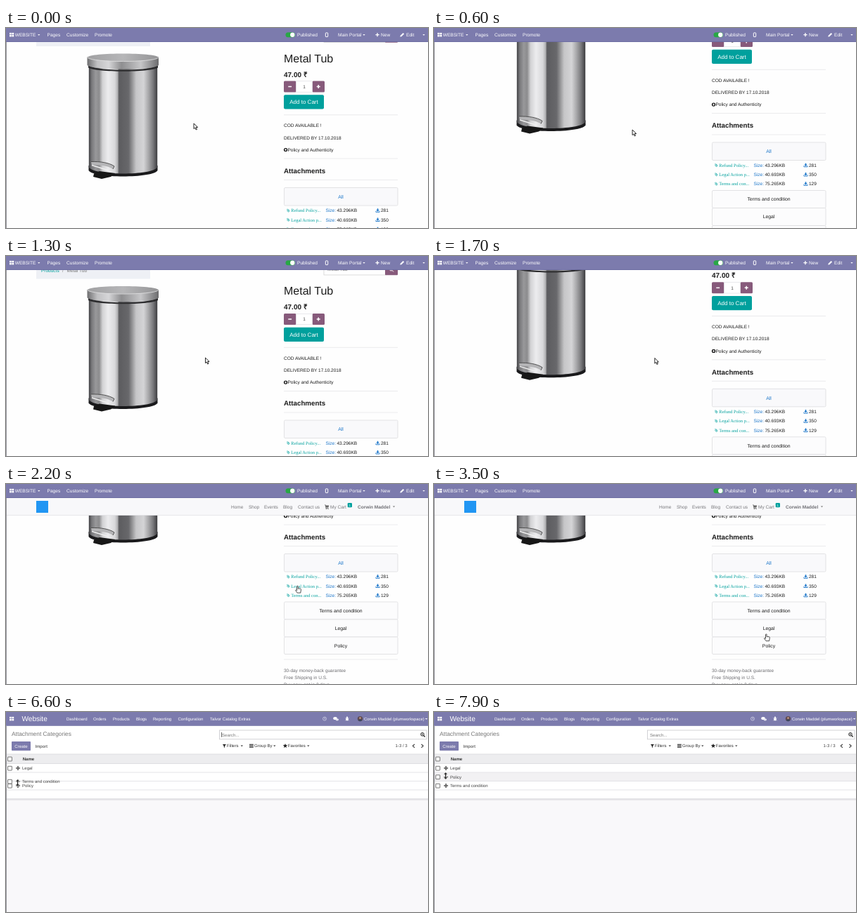
Animation, 600 px wide and 285 px high, one loop 8000 ms. Source, as an HTML page:

```html
<!DOCTYPE html>
<html lang="en">
<head>
<meta charset="utf-8">
<title>Shop page and category list</title>
<style>
html, body { margin: 0; width: 100%; height: 100%; overflow: hidden; background: #fff; }
svg { display: block; width: 600px; height: 285px; font-family: "Liberation Sans", Arial, sans-serif; text-rendering: geometricPrecision; }
</style>
</head>
<body>
<svg id="stage" viewBox="0 0 600 285" xmlns="http://www.w3.org/2000/svg"></svg>
<script>
const LOOP = 8000, SWITCH = 4600;
const PURPLE = '#7c7bad', PLUM = '#875a7b', TEAL = '#00a09d', BLUE = '#1a75c9', INK = '#1c1c1c';
const SERIF = '"Liberation Serif", "Times New Roman", serif';
const PRODUCT = 'Metal Tub', USER = 'Corwin Maddel';

// Markup helpers; text is placed by its vertical middle.
const text = (x, y, str, size, fill = INK, extra = '') =>
  `<text x="${x}" y="${(y + size * 0.36).toFixed(2)}" font-size="${size}" fill="${fill}" ${extra}>${str}</text>`;
const rect = (x, y, w, h, fill, extra = '') =>
  `<rect x="${x}" y="${y}" width="${w}" height="${h}" fill="${fill}" ${extra}/>`;
const path = (d, fill, extra = '') => `<path d="${d}" fill="${fill}" ${extra}/>`;
const line = (d, color, width = 1) => path(d, 'none', `stroke="${color}" stroke-width="${width}"`);
const circle = (x, y, r, fill, extra = '') => `<circle cx="${x}" cy="${y}" r="${r}" fill="${fill}" ${extra}/>`;
const group = (id, body, extra = '') => `<g id="${id}" ${extra}>${body}</g>`;
const caret = (x, y, fill) => path(`M${x - 1.7} ${y - 0.8}h3.4l-1.7 1.8z`, fill);
const plus = (x, y, r, color, w) => line(`M${x - r} ${y}h${2 * r}M${x} ${y - r}v${2 * r}`, color, w);
const stops = list => list.map(([o, c]) => `<stop offset="${o}%" stop-color="${c}"/>`).join('');
const BOLD = 'font-weight="bold"', MID = 'text-anchor="middle"';

const tiles = rect(5, 6.8, 2.8, 2.5, '#fff') + rect(8.4, 6.8, 2.8, 2.5, '#fff') +
  rect(5, 9.9, 2.8, 2.5, '#fff') + rect(8.4, 9.9, 2.8, 2.5, '#fff');

const defs = `<defs>
  <linearGradient id="steel">${stops([[0, '#3f3f42'], [4, '#77777a'], [10, '#98989a'], [15, '#8c8c8e'],
    [20, '#d2d2d4'], [28, '#ececee'], [38, '#d8d8da'], [42, '#b0b0b2'], [44, '#5c5c5f'], [58, '#68686b'],
    [63, '#929294'], [69, '#c6c6c8'], [80, '#d4d4d6'], [87, '#a8a8aa'], [94, '#77777a'], [100, '#3c3c3f']])}</linearGradient>
  <linearGradient id="lid">${stops([[0, '#6e6e70'], [14, '#c0c0c2'], [30, '#d6d6d8'], [48, '#8e8e90'], [75, '#c6c6c8'], [100, '#6c6c6e']])}</linearGradient>
  <linearGradient id="lidTop">${stops([[0, '#a0a0a2'], [50, '#b6b6b8'], [100, '#949496']])}</linearGradient>
</defs>`;

function bin() {
  return path('M117.500 196V203C124 214.300 209 214.300 215.500 203V196z', '#1a1a1c') +
    path('M117.800 54V198.500C125 210.500 208 210.500 215.200 198.500V54z', 'url(#steel)') +
    path('M117 53C127 62 206 62 216 53V56.500C206 63.500 127 63.500 117 56.500z', '#2c2c2e') +
    path('M115.500 41.500V53C124 60.500 209 60.500 217 53V41.500z', 'url(#lid)') +
    path('M115.500 42C119 34.800 213 34.800 217 42C209 49 124 49 115.500 42z', 'url(#lidTop)') +
    line('M115.800 42.300C124 49.300 209 49.300 216.700 42.300', '#dededf', 0.9) +
    path('M121 190.500C134 190 147 192 154 197L152 201C144 195.500 131 195 122 195z', '#b5b5b7') +
    line('M121 190.500C134 190 147 192 154 197L152 201', '#444', 0.9) +
    line('M122 195.500L146 203', '#f0f0f0', 1.4) +
    path('M125 207.500L133 204L155.500 207L149 212L136 215L124 212z', '#171717');
}

function attachment(y, name, size, count) {
  return line(`M399.300 ${y}l2.600 2.400M399.300 ${y - 1.8}l3.800 3.600M400.600 ${y - 2}l2.700 2.500`, TEAL, 0.8) +
    text(405.3, y, name, 6.5, TEAL, `font-family='${SERIF}'`) +
    text(454.5, y, 'Size:', 6.5, BLUE) + text(470.5, y, size, 6.5) +
    path(`M527.700 ${y - 2.8}h1.600v2h1.500l-2.300 2.300l-2.300-2.300h1.500z`, BLUE) +
    line(`M525.900 ${y + 0.8}v1.500h5.200v-1.500`, BLUE, 0.9) +
    text(533, y, count, 6.5);
}

function panel(y, h, label, color = INK, bg = '#fcfcfd') {
  return rect(395.5, y, 161.5, h, bg, 'stroke="#dcdcdf" stroke-width=".8" rx="1.5"') +
    text(476, y + h / 2, label, 6.85, color, MID);
}

function productPage() {
  const rule = y => line(`M395 ${y}H557`, '#e6e6e9', 0.8);
  return rect(43, 0, 162, 26, '#eef0f5') +
    text(50, 14.4, 'Products', 6.5, TEAL) + text(80, 14.4, '/', 6.5, '#888') + text(86.5, 14.4, PRODUCT, 6.5, '#777') +
    rect(452, 4, 88, 16.5, '#fff', 'stroke="#ccc" stroke-width=".7"') + text(457, 12.5, PRODUCT, 6.5, '#666') +
    rect(539, 4, 18, 16.8, PLUM, 'rx="1"') +
    circle(547.5, 12.5, 2, 'none', 'stroke="#fff" stroke-width=".9"') + line('M549 14l2 2', '#fff') +
    bin() +
    text(395, 43, PRODUCT, 16) + text(395, 66, '47.00 ₹', 10, INK, BOLD) +
    rect(395, 75.5, 17.5, 16, PLUM, 'rx="1.500"') + rect(435.5, 75.5, 17.5, 16, PLUM, 'rx="1.500"') +
    rect(412.5, 75.8, 23, 15.4, '#fff', 'stroke="#dcdce2" stroke-width=".6"') +
    line('M401.300 83.500h4.800', '#fff', 1.5) + plus(444.2, 83.5, 2.5, '#fff', 1.5) +
    text(424, 83.5, '1', 6.5, '#444', MID) +
    rect(395, 95.3, 57, 20.2, TEAL, 'rx="2"') + text(423.5, 105.4, 'Add to Cart', 8, '#fff', MID) +
    rule(123.8) + text(395, 139, 'COD AVAILABLE !', 6.5) + text(395, 156.3, 'DELIVERED BY 17.10.2018', 6.5) +
    circle(397.6, 173.6, 2.7, INK) + plus(397.6, 173.6, 1.6, '#fff', 0.9) +
    text(400.5, 173.4, 'Policy and Authenticity', 6.5) +
    rule(186) + text(395, 203.3, 'Attachments', 9.75, INK, BOLD) + rule(216.5) +
    panel(227.5, 25.5, 'All', BLUE, '#f9f9fb') +
    attachment(260, 'Refund Policy...', '43.296KB', '281') +
    attachment(273.2, 'Legal Action p...', '40.693KB', '350') +
    attachment(286.5, 'Terms and con...', '75.265KB', '129') +
    panel(296, 25, 'Terms and condition') + panel(321, 25, 'Legal') + panel(346, 24.5, 'Policy') +
    rule(378) +
    ['30-day money-back guarantee', 'Free Shipping in U.S.', 'Buy now, get in 2 days']
      .map((s, i) => text(395, 394 + i * 9.6, s, 6.5, '#6c6c70')).join('');
}

function stickyHeader() {
  const items = [[320, 'Home'], [345, 'Shop'], [367, 'Events'], [394, 'Blog'], [415, 'Contact us'], [461, 'My Cart']];
  return rect(0, 20, 600, 24.5, '#f8f8fa') + line('M0 44.500H600', '#e2e2e6', 0.8) +
    rect(43, 24, 17, 17, '#2196f3') +
    items.map(([x, s]) => text(x, 32.3, s, 6.5, '#77777b')).join('') +
    path('M453 29.600h1.400l.4 1h4.400l-.8 3h-3.300l.2.700h3.200v.6h-3.800l-.9-4.600h-.8z', '#666') +
    circle(455.4, 35.6, 0.7, '#666') + circle(458, 35.6, 0.7, '#666') +
    rect(485.7, 27, 6.3, 6.3, TEAL, 'rx="1.200"') + text(488.9, 30.2, '1', 4.6, '#fff', MID) +
    text(500, 32.3, USER, 6.5, '#717176', BOLD) + caret(551.5, 32.3, '#777');
}

const bar = h => rect(0, 0, 600, h, PURPLE) + rect(0, h - 0.5, 600, 0.5, '#5f5e97') + tiles;

function siteBar() {
  const items = [[12.7, 'WEBSITE'], [58.5, 'Pages'], [86, 'Customize'], [126, 'Promote'],
    [414, 'Published'], [472, 'Main Portal'], [533, 'New'], [569, 'Edit']];
  return bar(20) +
    items.map(([x, s]) => text(x, 9.7, s, 6.6, '#fff')).join('') +
    caret(46.8, 9.7, '#fff') + caret(509, 9.7, '#fff') + caret(594, 9.7, '#fff') +
    rect(397.5, 6.2, 13.5, 7, '#28a745', 'rx="3.500"') + circle(407.3, 9.7, 3.2, '#fff') +
    rect(454.3, 6.9, 3.4, 5.6, 'none', 'stroke="#fff" stroke-width="1" rx=".6"') +
    plus(528, 9.7, 2.6, '#fff', 1.3) +
    path('M560.300 12.600l.4-1.800l3.900-3.900l1.500 1.500l-3.900 3.900z', '#fff');
}

const CROSS = 'M0-3.200l1.300 1.500h-.8v1.200h1.200v-.8l1.500 1.300l-1.500 1.300v-.8h-1.200v1.200h.8l-1.300 1.500l-1.300-1.500h.8v-1.200h-1.200v.8l-1.500-1.300l1.500-1.300v.8h1.200v-1.200h-.8z';
const checkbox = y => rect(2.6, y - 2.9, 5.8, 5.8, '#fff', 'stroke="#555" stroke-width=".8" rx=".4"');
const row = (id, label) => group(id, checkbox(0.2) + path(CROSS, '#333', 'transform="translate(17 0)"') + text(23, 0, label, 6, '#444'));

function adminPage() {
  const menu = [[86, 'Dashboard'], [124, 'Orders'], [152, 'Products'], [185, 'Blogs'], [209, 'Reporting'],
    [244.5, 'Configuration'], [290, 'Talvor Catalog Extras']];
  const tools = [[314, 'Filters', 335.3], [353, 'Group By', 381.8], [400.8, 'Favorites', 429.8]];
  return rect(0, 0, 600, 285, '#f9f8fa') + rect(0, 0, 600, 124, '#fff') +
    bar(19.5) + text(22.5, 9.6, 'Website', 10.1, '#fff') +
    menu.map(([x, s]) => text(x, 9.6, s, 6.05, '#fff')).join('') +
    circle(453, 9.6, 2.5, 'none', 'stroke="#dcdcec" stroke-width=".7"') + line('M453 8v1.800h1.200', '#dcdcec', 0.7) +
    '<ellipse cx="468" cy="9" rx="2.800" ry="2" fill="#fff"/><ellipse cx="470.800" cy="10.800" rx="2.300" ry="1.600" fill="#e4e4f0"/>' +
    '<ellipse cx="485" cy="10.300" rx="1.700" ry="2.300" fill="#fff"/>' +
    line('M482.500 8.500l5 3.500M487.500 8.500l-5 3.500', '#fff', 0.7) + circle(485, 7.6, 1.1, '#fff') +
    circle(503.5, 9.6, 3.7, '#5d4a52') + circle(503.5, 8.6, 1.5, '#b88f7c') + path('M500.800 12.100q2.700-3.400 5.400 0q-2.700 2.200-5.400 0z', '#39465e') +
    text(509, 9.6, USER + ' (plumworkspace)', 5.9, '#fff') + caret(597.6, 9.8, '#fff') +
    text(8, 31, 'Attachment Categories', 8.35, '#777') +
    rect(303.5, 26, 294.5, 12.8, '#fff', 'stroke="#c8c8cc" stroke-width=".8"') + text(307, 32.3, 'Search...', 6.1, '#777') +
    group('blink', line('M306.600 28.800v7', '#222', 0.7)) +
    circle(592, 31.8, 2.3, '#fff', 'stroke="#222" stroke-width="1"') + plus(592, 31.8, 1.1, '#222', 0.6) + line('M593.700 33.500l2 2', '#222', 1.2) +
    rect(8, 42, 27, 13, PURPLE, 'rx=".8"') + text(21.5, 48.4, 'Create', 6.1, '#fff', MID) + text(41.6, 48.4, 'Import', 6.1, '#333') +
    tools.map(([x, s, c]) => text(x, 48.3, s, 6.05, '#333') + caret(c, 48.3, '#333')).join('') +
    path('M308 46h5l-2 2.400v2.600l-1.200-.9v-1.700z', '#222') +
    [46.3, 48.3, 50.3].map(y => line(`M346 ${y}h5.800`, '#222', 1.1)).join('') +
    path('M397 45l.9 2.100l2.300.2l-1.800 1.500l.6 2.200l-2-1.200l-2 1.200l.6-2.200l-1.800-1.500l2.300-.2z', '#222') +
    text(553.5, 48.3, '1-3 / 3', 6.05, '#444') +
    line('M581 45.800l-2.700 2.500l2.700 2.500M590.500 45.800l2.700 2.500l-2.700 2.500', '#333', 1.1) +
    rect(0, 60, 600, 13.5, '#ededef') + line('M0 60H600M0 73.500H600', '#d8d8dc', 0.8) +
    checkbox(67) + text(23.7, 67, 'Name', 6.05, '#333', BOLD) +
    rect(0, 74, 600, 12, '#f2f1f3', 'id="hover"') +
    [86, 98.5, 111].map(y => line(`M0 ${y}H600`, '#dedee2', 0.8)).join('') +
    rect(0, 123, 600, 2.8, '#e4e4e7') +
    row('legal', 'Legal') + row('policy', 'Policy') + row('terms', 'Terms and condition');
}

const pointers =
  group('arrow', path('M0 0V7.600L1.800 6L3.100 9L4.500 8.400L3.200 5.500H5.600z', '#fff', 'stroke="#111" stroke-width=".9" stroke-linejoin="round"')) +
  group('hand', path('M-1.500 4V-1.500a.8.800 0 0 1 1.600 0V1.500h3.200q1.200.3 1 1.500L3.600 7.500H-1L-3.600 3.800q.4-1.300 2.100.2z', '#fff', 'stroke="#222" stroke-width=".8" stroke-linejoin="round"')) +
  group('grip', path('M0-5.200L3-1.900H1V1.900H3L0 5.200L-3 1.900H-1V-1.900H-3z', '#222', 'stroke="#fff" stroke-width=".7" stroke-linejoin="round"'));

const stage = document.getElementById('stage');
stage.innerHTML = defs +
  group('shop', rect(0, 0, 600, 285, '#fefefe') + group('page', productPage()) + group('sticky', stickyHeader()) + siteBar()) +
  group('admin', adminPage()) +
  rect(0, 20, 0.9, 265, '#8c8c92') +
  group('pointer', pointers);

const el = id => document.getElementById(id);
const show = (id, on) => el(id).setAttribute('display', on ? 'inline' : 'none');
const move = (id, x, y) => el(id).setAttribute('transform', `translate(${x.toFixed(2)} ${y.toFixed(2)})`);

// Eased value between [time, value] keys.
function ease(t, keys) {
  if (t <= keys[0][0]) return keys[0][1];
  for (let i = 1; i < keys.length; i++) {
    const [t0, a] = keys[i - 1], [t1, b] = keys[i];
    if (t <= t1) {
      const u = (t - t0) / (t1 - t0);
      return a + (b - a) * u * u * (3 - 2 * u);
    }
  }
  return keys[keys.length - 1][1];
}

const scrollKeys = [[0, 0], [600, 64.5], [750, 66], [1300, -6.5], [1450, -6.5], [2100, 128]];
const stickyKeys = [[1850, -25], [2050, 0]];
const shopX = [[0, 267], [500, 282], [1300, 283.5], [1500, 284], [2150, 415], [2500, 418], [3100, 472], [3900, 474], [4500, 431]];
const shopY = [[0, 136], [500, 145], [1500, 145], [2150, 147], [2500, 158], [3100, 179], [3700, 229], [4500, 188]];
const adminX = [[4720, 431], [5480, 16.5]];
const adminY = [[4720, 188], [5500, 82], [6200, 82], [6600, 101], [6900, 107], [7300, 107], [7750, 91]];
const GRAB = 6200, DROP = 7100;
const SLOTS = [80, 92.5, 105];

function drawShop(t) {
  move('page', 0, -ease(t, scrollKeys));
  move('sticky', 0, ease(t, stickyKeys));
  show('sticky', t > 1850);
  const x = ease(t, shopX), y = ease(t, shopY);
  const link = t > 2050 && x > 395 && x < 557 && y > 99 && y < 243;
  return [x, y, link ? 'hand' : 'arrow'];
}

function drawAdmin(t) {
  const x = ease(t, adminX), y = ease(t, adminY);
  const dragging = t >= GRAB && t < DROP;
  const terms = t < GRAB ? SLOTS[0] : dragging ? y - 2 : SLOTS[2];
  move('terms', 0, terms);
  move('legal', 0, terms > 88 ? SLOTS[0] : SLOTS[1]);
  move('policy', 0, terms > 101 ? SLOTS[1] : SLOTS[2]);
  const slot = Math.floor((y - 73.5) / 12.5);
  const over = slot >= 0 && slot < 3;
  show('hover', over && !dragging);
  if (over) el('hover').setAttribute('y', 73.8 + slot * 12.5);
  show('blink', Math.floor((t - 4701) / 500) % 2 !== 0);
  return [x, y, over && x < 23 ? 'grip' : 'arrow'];
}

function draw(t) {
  const shop = t < SWITCH;
  show('shop', shop);
  show('admin', !shop);
  const [x, y, kind] = shop ? drawShop(t) : drawAdmin(t);
  move('pointer', x, y);
  ['arrow', 'hand', 'grip'].forEach(k => show(k, k === kind));
}

const start = performance.now();
function tick() {
  draw((performance.now() - start) % LOOP);
  requestAnimationFrame(tick);
}
draw(0);
requestAnimationFrame(tick);
</script>
</body>
</html>
```
